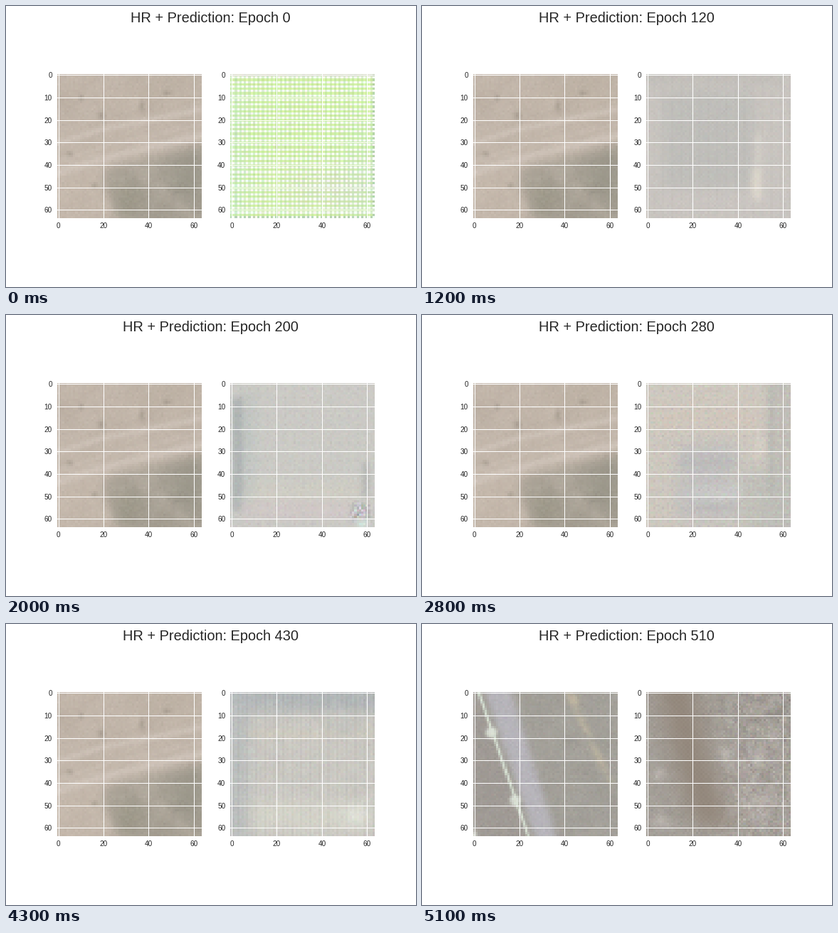
A matplotlib script for the animation above (5.2 s loop, 576 by 396 pixels).

```python
import numpy as np
import matplotlib.pyplot as plt
from matplotlib.animation import FuncAnimation

WIDTH, HEIGHT, DPI = 576, 396, 72
FRAMES, INTERVAL = 52, 100
SCENE_CUT = 48
N = 64
Y, X = np.mgrid[:N, :N].astype(float)

plt.rcParams.update({
    "font.family": "Liberation Sans",
    "font.size": 10,
    "text.color": "#262626",
    "xtick.labelcolor": "#262626",
    "ytick.labelcolor": "#262626",
})


# ---------- painting helpers ----------

def fill(color):
    return np.ones((N, N, 3)) * color


def paint(img, color, mask):
    """Blend a colour into an image through a mask of 0..1."""
    return img + mask[..., None] * (np.array(color, float) - img)


def step(d, soft=1.0):
    return 1 / (1 + np.exp(np.clip(-d / soft, -40, 40)))


def box(x0, x1, y0, y1, soft=0.8):
    return (step(X - x0, soft) * step(x1 - X, soft)
            * step(Y - y0, soft) * step(y1 - Y, soft))


def spot(x, y, rx, ry):
    return np.exp(-((X - x) / rx) ** 2 - ((Y - y) / ry) ** 2)


def ridge(d, width):
    return np.exp(-(d / width) ** 2)


def cloud(seed, cells):
    """Smooth random field made from a coarse grid of normal values."""
    grid = np.random.default_rng(seed).normal(size=(cells, cells))
    pos = np.linspace(0, cells - 1, N)
    w = np.clip(1 - abs(pos[:, None] - np.arange(cells)), 0, 1)
    return w @ grid @ w.T


def grain(seed, amount, color_amount=0.0):
    rng = np.random.default_rng(seed)
    return (rng.normal(size=(N, N, 1)) * amount
            + rng.normal(size=(N, N, 3)) * color_amount)


def every(axis, period, phase=0):
    return ((axis + phase) % period == 0).astype(float)


# ---------- left panel ----------

def field_scene():
    img = fill((194, 182, 170)) + cloud(1, 12)[..., None] * 2.5
    img = paint(img, (184, 173, 159), 0.6 * box(36, 66, -3, 12, 4))
    img = paint(img, (200, 187, 174), 0.6 * box(-3, 20, 42, 66, 4))
    edge_top = np.interp(X, [18, 24, 40, 63], [44, 41, 37, 31])
    edge_left = np.interp(Y, [40, 46, 55, 63], [20, 20, 23, 26])
    dark = step(Y - edge_top, 1.6) * step(X - edge_left, 1.5)
    img = paint(img, (167, 160, 148), dark)
    img = paint(img, (153, 150, 137), 0.7 * dark * spot(58, 46, 11, 14))
    img = paint(img, (156, 152, 136), 0.7 * dark * spot(31, 56, 7, 8))
    img = paint(img, (179, 171, 159), 0.6 * dark * ridge(Y - 55 - (X - 50) * 0.9, 4))
    img += (dark * cloud(6, 16))[..., None] * 2.5
    low = Y - np.interp(X, [0, 20, 40, 63], [43, 37, 32, 27])
    high = Y - np.interp(X, [0, 20, 40, 63], [30, 24, 20, 15])
    img = paint(img, (208, 197, 187), 0.8 * ridge(low, 2.2))
    img = paint(img, (208, 197, 187), 0.7 * ridge(high, 1.6))
    img = paint(img, (204, 193, 182), 0.4 * ridge(low + 5, 1.2))
    marks = [(5, 35, 1.8, 1.4), (48, 8, 1.5, 1.2), (37, 14, 1.2, 2.4),
             (19, 18, 1.6, 2), (16, 49, 1.6, 1.2), (10, 10, 1.2, 1.6)]
    for x, y, rx, ry in marks:
        img = paint(img, (152, 143, 131), 0.5 * spot(x, y, rx, ry))
    return img + grain(2, 1.8, 0.6)


def road_scene():
    img = fill((163, 160, 153)) + cloud(3, 10)[..., None] * 2
    line = X - 2 - Y * 0.345
    img = paint(img, (159, 153, 148), 0.8 * step(-line))
    left = X - 5 - Y * 0.345
    right = 16.5 + Y * 0.31 - X
    img = paint(img, (185, 183, 190), 0.9 * step(left, 0.8) * step(right, 0.9))
    track = X - 42 - Y * 0.46
    broken = 0.4 + 0.3 * np.tanh(cloud(4, 20))
    img = paint(img, (193, 183, 160), broken * ridge(track, 2) * step(39 - Y, 2))
    img = paint(img, (203, 190, 168), 0.5 * spot(44, 3, 3, 2.5))
    img = paint(img, (216, 227, 213), 0.9 * ridge(line, 0.75))
    for x, y in [(7.5, 17.5), (18, 47.5)]:
        disc = step(2.4 - np.hypot(X - x, Y - y), 0.35)
        img = paint(img, (221, 227, 216), 0.9 * disc)
    img = paint(img, (225, 230, 218), 0.8 * spot(0, 63, 1.3, 2))
    return img + grain(5, 2.2, 1.2)


# ---------- right panel ----------

def lime_check():
    col, row = every(X, 2), every(Y, 2)
    img = fill((249, 252, 246))
    img = paint(img, (220, 240, 208), col * (1 - row))
    img = paint(img, (216, 244, 172), row * (1 - col))
    img = paint(img, (200, 234, 160), row * col)
    img = paint(img, (216, 212, 209), 0.4 * spot(46, 50, 22, 9) * np.maximum(row, col))
    img = paint(img, (190, 228, 214), 0.3 * box(-4, 6, 5, 64, 2) * np.maximum(row, col))
    img = paint(img, (185, 224, 208), 0.25 * box(52, 66, 20, 64, 4) * np.maximum(row, col))
    img = paint(img, (214, 213, 206), 0.8 * (Y < 1))
    img = paint(img, (170, 200, 170), 0.7 * ((X > 62) | (Y > 62)) * every(X + Y, 2, 1))
    return img + grain(11, 1.5, 3)


def grey_frame():
    img = fill((200, 196, 191))
    img = paint(img, (190, 189, 185), 0.9 * box(7, 47, 7, 51, 1.5))
    img = paint(img, (191, 188, 183), 0.7 * box(-5, 60, -5, 4, 1.5))
    img = paint(img, (204, 198, 195), 0.5 * box(5, 60, 52, 60, 1.5))
    img = paint(img, (211, 206, 200), 0.7 * box(47.5, 51, 26, 56, 0.7))
    img = paint(img, (226, 219, 206), 0.8 * box(46.5, 50, 42, 55, 0.9))
    img -= 2 * every(X, 4, 1)[..., None]
    return img + 1.5 * ((X + Y) % 2)[..., None] + grain(12, 1.2, 1.2)


def pale_frame():
    img = fill((203, 202, 197))
    img = paint(img, (190, 196, 193), 0.7 * box(4, 11, 4, 58, 1.5))
    img = paint(img, (171, 177, 177), 0.9 * box(0.5, 5, 6, 56, 0.8))
    img = paint(img, (209, 207, 195), 0.7 * box(8, 58, 44, 52, 1.5))
    img = paint(img, (209, 200, 199), 0.8 * box(4, 54, 52, 60, 1.2))
    img = paint(img, (176, 179, 177), 0.8 * box(58, 61, 35, 50, 0.7))
    img -= 5 * (every(X, 4) * every(Y, 4, 2))[..., None]
    corner = box(53.5, 61, 53, 61, 0.8)
    img = paint(img, (184, 182, 186), 0.7 * corner)
    img += grain(13, 17, 9) * corner[..., None]
    img = paint(img, (215, 240, 232), 0.8 * spot(58, 62, 2.5, 1.5))
    return img + grain(14, 1.5, 1.8)


def beige_blocks():
    img = fill((206, 200, 191))
    img = paint(img, (210, 198, 187), 0.8 * box(3, 52, 10, 20, 2))
    img = paint(img, (189, 186, 180), 0.8 * box(53, 66, -4, 66, 1.2))
    img = paint(img, (189, 189, 183), 0.8 * box(41, 66, 38, 66, 2))
    img = paint(img, (191, 189, 190), 0.8 * box(13, 40, 26, 61, 2))
    img = paint(img, (203, 203, 201), 0.8 * box(19, 40, 45, 52, 1))
    img = paint(img, (181, 181, 182), 0.5 * box(14, 40, 32, 37, 1))
    img = paint(img, (182, 181, 180), 0.5 * box(18, 40, 53, 56, 0.8))
    img = paint(img, (215, 209, 200), 0.8 * spot(50, 28, 2.5, 5))
    img = paint(img, (176, 179, 174), 0.6 * box(54, 55.5, 0, 50, 0.5))
    dots = every(X, 4, 1) * every(Y, 4, 1)
    img = paint(img, (192, 183, 184), 0.5 * dots)
    img = paint(img, (188, 208, 188), 0.45 * every(X, 4, 2) * every(Y, 4, 3))
    return img + grain(15, 1.8, 2.5)


def pink_weave():
    img = fill((193, 189, 185))
    img = paint(img, (222, 208, 222), 0.75 * step(9 - X, 2.5) * (1 - Y / 130))
    img = paint(img, (222, 204, 218), 0.6 * step(4 - Y, 2))
    img = paint(img, (168, 173, 168), 0.8 * box(50, 59, 3, 62, 1.2))
    col, row = every(X, 4), every(Y, 4, 2)
    pink = 0.75 - 0.25 * X / N - 0.2 * Y / N
    img = paint(img, (228, 186, 218), pink * np.maximum(col, row * every(X, 2)))
    img = paint(img, (170, 205, 168), 0.6 * every(Y, 4) * (1 - col))
    img = paint(img, (222, 223, 216), 0.6 * every(X, 4, 2) * every(Y, 4, 1))
    img = paint(img, (150, 158, 152), 0.5 * box(50, 60, 3, 62) * every(X, 4, 1))
    bright = box(59.5, 61.5, 2, 61, 0.2)
    img = paint(img, (165, 236, 170), 0.9 * bright * (Y % 4 < 2))
    img = paint(img, (170, 205, 232), 0.8 * bright * (Y % 4 >= 2))
    img = paint(img, (170, 170, 168), 0.6 * step(Y - 61, 0.6))
    return img + grain(16, 2, 3)


def bright_base():
    img = fill((202, 200, 194))
    img = paint(img, (176, 181, 183), 0.85 * step(8 - Y, 1.5))
    img = paint(img, (183, 187, 188), 0.75 * step(8 - X, 1.8))
    img = paint(img, (217, 217, 205), 0.8 * box(9, 61, 49, 60, 2))
    img = paint(img, (228, 230, 221), 0.7 * spot(55, 54, 6, 5))
    img = paint(img, (211, 206, 189), 0.5 * ridge(Y - 18, 2) * step(X - 8))
    img = paint(img, (187, 190, 187), 0.5 * spot(50, 16, 8, 4))
    img += (3 * every(X, 2) - 1.5 - 3 * every(X, 4, 1))[..., None]
    img += cloud(17, 16)[..., None] * 1.8
    return img + grain(18, 1.6, 2)


def brown_blur():
    img = fill((164, 159, 152))
    img = paint(img, (173, 166, 161), 0.7 * box(34, 60, 20, 62, 4))
    middle = X - np.interp(Y, [0, 30, 63], [13, 20, 30])
    band = ridge(middle, 10) * step(59 - Y, 2)
    img = paint(img, (147, 135, 123), 0.9 * band)
    spots = [(35, 28, 3, 4), (50, 28, 3, 4), (50, 50, 4, 4),
             (56, 18, 3, 3), (6, 57, 4, 3), (5, 36, 3, 3)]
    for x, y, rx, ry in spots:
        img = paint(img, (196, 190, 184), 0.6 * spot(x, y, rx, ry))
    rough = (1 - 0.85 * band) * (0.45 + 0.55 * step(X - 32, 3))
    img += grain(19, 5, 3) * rough[..., None]
    img += cloud(20, 22)[..., None] * 5 * rough[..., None]
    return img + 3 * ((X + Y) % 2)[..., None] - 1.5


# ---------- timeline ----------

SCENES = field_scene(), road_scene()
KEYS = [(0, lime_check()), (12, grey_frame()), (20, pale_frame()),
        (28, beige_blocks()), (35, pink_weave()), (43, bright_base())]
FINAL = brown_blur()


def wobble(i):
    """Change of tint and shading from one epoch to the next."""
    tint = np.random.default_rng(100 + i).normal(size=3) * 3
    return tint + cloud(200 + i, 7)[..., None] * 4 + grain(300 + i, 1, 2)


def prediction(i):
    if i >= SCENE_CUT:
        left = FRAMES - 1 - i
        return FINAL + wobble(i) * min(left, 1)
    for (a, first), (b, second) in zip(KEYS, KEYS[1:]):
        if a <= i < b:
            u = (i - a) / (b - a)
            # The first pattern fades quickly, later ones drift evenly.
            w = 1 - (1 - u) ** 2 if a == 0 else u
            return first + (second - first) * w + wobble(i) * 4 * u * (1 - u)
    start, last = KEYS[-1]
    return last + wobble(i) * min(i - start, 1)


def to_rgb(img):
    return np.clip(img, 0, 255) / 255


# ---------- figure ----------

LEFT, TOP = 72, 95.6
SIDE = 0.775 * WIDTH / 2.2

fig = plt.figure(figsize=(WIDTH / DPI, HEIGHT / DPI), dpi=DPI, facecolor="white")
title = fig.text(287.5 / WIDTH, 0.98, "", size=20, ha="center", va="top")


def panel(left):
    ax = fig.add_axes([left / WIDTH, 1 - (TOP + SIDE) / HEIGHT,
                       SIDE / WIDTH, SIDE / HEIGHT])
    image = ax.imshow(np.ones((N, N, 3)), interpolation="nearest", aspect="auto")
    ax.set_xticks(range(0, N, 20))
    ax.set_yticks(range(0, N, 10))
    ax.tick_params(axis="x", length=0, pad=6.3)
    ax.tick_params(axis="y", length=0, pad=7)
    ax.set_axisbelow(True)
    ax.grid(True, color="white", linewidth=1, linestyle="-")
    ax.spines[:].set_visible(False)
    return image


truth, guess = panel(LEFT), panel(LEFT + 1.2 * SIDE)


def update(i):
    title.set_text(f"HR + Prediction: Epoch {i * 10}")
    truth.set_data(to_rgb(SCENES[i >= SCENE_CUT]))
    guess.set_data(to_rgb(prediction(i)))
    return title, truth, guess


anim = FuncAnimation(fig, update, frames=FRAMES, interval=INTERVAL,
                     repeat=True, repeat_delay=0, blit=False)
plt.show()
```
